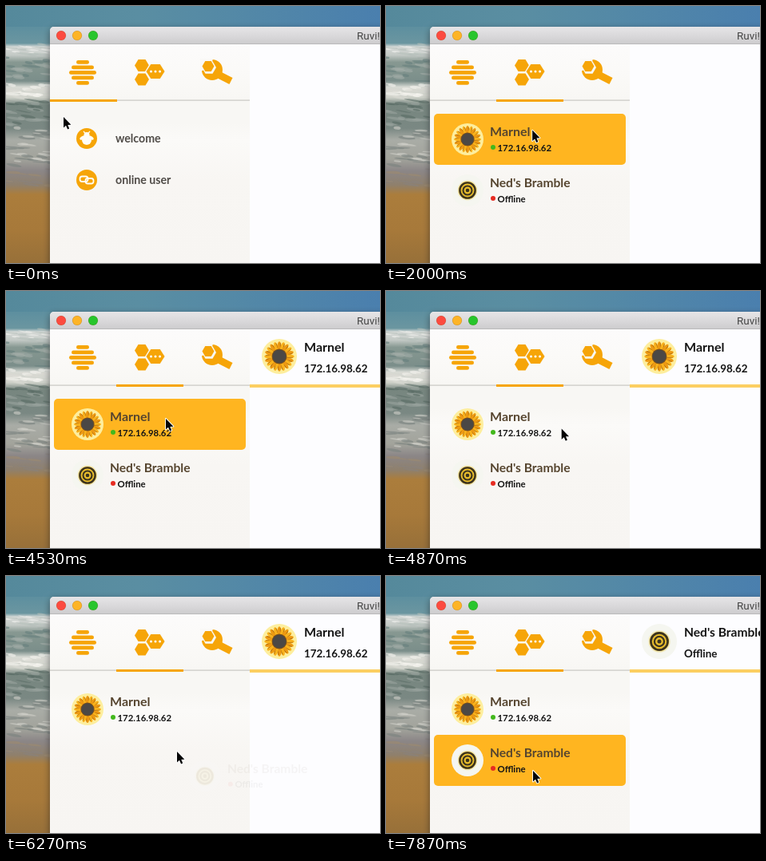
An HTML page with a canvas for the animation above (8.07 s loop, 468 by 322 pixels).

```html
<!DOCTYPE html>
<html lang="en">
<head>
<meta charset="utf-8">
<title>Contact list</title>
<style>
html, body { margin: 0; width: 100%; height: 100%; overflow: hidden; }
canvas { display: block; width: 468px; height: 322px; }
</style>
</head>
<body>
<canvas id="stage"></canvas>
<script>
const W = 468, H = 322, LOOP = 8070, TAU = Math.PI * 2;
const ORANGE = '#f6a508', ROW = '#ffb520', PANEL = '#f9f8f6';
const SANS = 'Lato, "Open Sans", sans-serif';
const canvas = document.getElementById('stage');
const dpr = window.devicePixelRatio || 1;
canvas.width = W * dpr;
canvas.height = H * dpr;
let c = canvas.getContext('2d');

const ease = p => p < .5 ? 2 * p * p : 1 - 2 * (1 - p) * (1 - p);
const ramp = (t, a, b) => ease(Math.min(1, Math.max(0, (t - a) / (b - a))));
const mix = (a, b, p) => a + (b - a) * p;

function rect(x, y, w, h, fill, r = 0) {
  c.fillStyle = fill;
  c.beginPath();
  c.roundRect(x, y, w, h, r);
  c.fill();
}

function disc(x, y, r, fill) {
  c.fillStyle = fill;
  c.beginPath();
  c.arc(x, y, r, 0, TAU);
  c.fill();
}

function ring(x, y, r, width, color) {
  c.strokeStyle = color;
  c.lineWidth = width;
  c.beginPath();
  c.arc(x, y, r, 0, TAU);
  c.stroke();
}

function poly(points, fill) {
  c.fillStyle = fill;
  c.beginPath();
  points.forEach(([x, y]) => c.lineTo(x, y));
  c.closePath();
  c.fill();
}

function hexagon(x, y, rx, ry, fill) {
  poly([[x - rx, y], [x - rx / 2, y - ry], [x + rx / 2, y - ry],
    [x + rx, y], [x + rx / 2, y + ry], [x - rx / 2, y + ry]], fill);
}

function text(s, x, y, size, color, weight = 700, family = SANS) {
  c.font = `${weight} ${size}px ${family}`;
  c.fillStyle = color;
  c.fillText(s, x, y);
}

function gradient(x0, y0, x1, y1, stops) {
  const g = c.createLinearGradient(x0, y0, x1, y1);
  stops.forEach(([p, color]) => g.addColorStop(p, color));
  return g;
}

// Draws with an offset and opacity.
function layer(alpha, dx, dy, draw) {
  if (alpha <= 0) return;
  c.save();
  c.globalAlpha *= alpha;
  c.translate(dx, dy);
  draw();
  c.restore();
}

// Brings content in from the lower right; p = 1 is at rest.
const slide = (p, draw) => layer(p * p, 187 * (1 - p), 25 * (1 - p), draw);

function wallpaper() {
  rect(0, 0, W, 50, gradient(0, 0, W, 0,
    [[0, '#55899b'], [.35, '#5a8ea2'], [.6, '#5489a6'], [1, '#4a7fae']]));
  rect(0, 26, 60, H - 26, gradient(0, 26, 0, H, [
    [0, '#5d8f9f'], [.07, '#6b96a0'], [.085, '#d5d9d6'], [.12, '#c3c9c5'],
    [.15, '#879891'], [.23, '#7b8e8a'], [.255, '#d8dad4'], [.3, '#cdd0c8'],
    [.33, '#77867f'], [.43, '#7a8883'], [.48, '#a9aca6'], [.56, '#a2a39b'],
    [.61, '#8b8687'], [.67, '#8f806c'], [.71, '#ab7d3c'], [.86, '#a7793a'], [1, '#977039']]));
  let seed = 11;
  const rnd = () => (seed = (seed * 16807) % 2147483647) / 2147483647;
  const flecks = (n, top, bottom, colors) => {
    for (let i = 0; i < n; i++) {
      c.fillStyle = colors[i % colors.length];
      c.beginPath();
      c.ellipse(rnd() * 56, mix(top, bottom, rnd()), 4 + rnd() * 9, .6 + rnd() * 1.5, rnd() * .2, 0, TAU);
      c.fill();
    }
  };
  c.globalAlpha = .6;
  flecks(16, 48, 61, ['#f1f1ee', '#b5bfbb']);
  flecks(22, 64, 95, ['#667f7d', '#a3aea9']);
  flecks(28, 97, 115, ['#f6f5f0', '#d8d9d2']);
  flecks(26, 118, 150, ['#596a64', '#99a49e']);
  flecks(30, 152, 200, ['#d0d0c9', '#7a827e']);
  flecks(10, 204, 226, ['#88827d', '#9d8a70']);
  c.globalAlpha = 1;
}

function hiveIcon() {
  [8, 14, 17, 14, 8].forEach((w, i) =>
    rect(96 - w, 68 + i * 6.5, w * 2, 4.8, ORANGE, 2.4));
}

function hexIcon() {
  hexagon(170, 74.5, 9, 7.5, ORANGE);
  hexagon(170, 92, 9, 7.5, ORANGE);
  hexagon(187, 82, 13, 10.5, PANEL);
  hexagon(187, 82, 11.5, 9, ORANGE);
  [181.5, 187, 192.5].forEach(x => disc(x, 82, 1.5, '#fff'));
}

function wrenchIcon() {
  c.strokeStyle = ORANGE;
  c.lineCap = 'butt';
  c.lineWidth = 9;
  c.beginPath();
  c.moveTo(262, 84);
  c.lineTo(281.5, 94);
  c.stroke();
  disc(258, 80, 13, ORANGE);
  poly([[243, 82], [243, 66], [259, 66], [256, 77]], PANEL);
  hexagon(254, 77, 9, 7.8, PANEL);
  hexagon(253, 75.5, 7.5, 6.6, ORANGE);
}

function windowFrame() {
  c.save();
  c.shadowColor = 'rgba(20,20,25,.5)';
  c.shadowBlur = 10 * dpr;
  c.shadowOffsetY = 3 * dpr;
  rect(55, 26, 430, 320, PANEL, [5, 0, 0, 0]);
  c.restore();
  rect(55, 26, 430, 22, gradient(0, 26, 0, 48,
    [[0, '#e6e5e7'], [.5, '#dad9db'], [1, '#cccbcd']]), [5, 0, 0, 0]);
  rect(55, 47.3, 430, .7, '#b5b4b4');
  ['#fc4b40', '#fdb427', '#27c52c'].forEach((color, i) => {
    disc(69 + i * 20, 37, 6, color);
    ring(69 + i * 20, 37, 5.8, .6, 'rgba(110,60,0,.3)');
  });
  text('Ruvi!', 439, 42, 13.5, '#474747', 400, 'Roboto, Inter, sans-serif');
  rect(55, 48, 250, 274, gradient(0, 48, 0, H, [
    [0, '#fcfbfb'], [.12, '#fbfaf8'], [.25, '#f8f7f4'], [.36, '#f8f7f4'],
    [.44, '#fbfaf8'], [.62, '#f8f6f3'], [1, '#f7f5f2']]));
  rect(305, 48, 163, 274, '#fdfdff');
  hiveIcon();
  hexIcon();
  wrenchIcon();
  rect(55, 117.4, 250, 1.4, '#cbc9c6');
}

function welcomeList() {
  disc(101, 166, 13, ORANGE);
  const pale = '#fffdf6';
  disc(101, 168, 6, pale);
  disc(101, 161.5, 3.5, pale);
  c.fillStyle = pale;
  [-1, 1].forEach(s => {
    c.beginPath();
    c.ellipse(101 + s * 5, 165, 4, 2, s * .5, 0, TAU);
    c.fill();
  });
  c.strokeStyle = pale;
  c.lineWidth = 1.2;
  c.beginPath();
  c.moveTo(97, 157); c.lineTo(99.5, 160);
  c.moveTo(105, 157); c.lineTo(102.5, 160);
  c.stroke();

  disc(101, 218, 13, ORANGE);
  c.lineWidth = 1.8;
  [[92.5, 213.5], [99.5, 216]].forEach(([x, y]) => {
    c.beginPath();
    c.roundRect(x, y, 10, 6.5, 2.8);
    c.stroke();
  });
  text('welcome', 137, 171, 14.2, '#504c48');
  text('online user', 137, 223, 14.2, '#504c48');
}

function sunflower(x, y, k) {
  c.save();
  c.translate(x, y);
  c.scale(k, k);
  disc(0, 0, 20, '#fdee9e');
  for (let i = 0; i < 20; i++) {
    c.rotate(TAU / 20);
    c.fillStyle = i % 2 ? '#f9b21c' : '#ee9a12';
    c.beginPath();
    c.ellipse(11.5, 0, 5.5, 2.2, 0, 0, TAU);
    c.fill();
    c.strokeStyle = '#9a5b12';
    c.lineWidth = .6;
    c.beginPath();
    c.moveTo(8, 1.6);
    c.lineTo(15.5, 1);
    c.stroke();
  }
  disc(0, 0, 8.6, '#77501f');
  disc(0, 0, 7.6, '#4b4845');
  c.restore();
}

function bullseye(x, y, k) {
  c.save();
  c.translate(x, y);
  c.scale(k, k);
  disc(0, 0, 20, '#f5f6f0');
  disc(0, 0, 12.4, '#efe6b4');
  disc(0, 0, 11, '#e9bd2c');
  ring(0, 0, 9.6, 2.4, '#3b3320');
  ring(0, 0, 5.5, 2.1, '#3b3320');
  disc(0, 0, 2.3, '#3b3320');
  c.restore();
}

const people = [
  { name: 'Marnel', state: '172.16.98.62', dot: '#42b81c', size: 16, avatar: sunflower },
  { name: "Ned's Bramble", state: 'Offline', dot: '#e62b22', size: 15.6, avatar: bullseye }
];

function personRow(i, glow) {
  const p = people[i], y = 135 + i * 64;
  layer(glow, 0, 0, () => rect(60, y, 240, 64, ROW, 5));
  p.avatar(102, y + 32, 1);
  text(p.name, 130, y + 28, p.size, '#56452f');
  disc(134, y + 42, 3, p.dot);
  text(p.state, 139.5, y + 46.5, 11.4, '#151515');
}

function header(i) {
  const p = people[i];
  rect(305, 48, 163, 73, '#fdfdff');
  p.avatar(342, 82, 1.1);
  text(p.name, 373, 76, p.size, '#151515');
  text(p.state, 373, 101.5, 13.4, '#151515');
  rect(305, 117, 163, 4, '#fccf62');
}

function tooltip() {
  rect(177, 171, 36, 15, '#f0e6d2', 1);
  c.strokeStyle = '#c9bca4';
  c.lineWidth = .7;
  c.strokeRect(177, 171, 36, 15);
  text('online', 180, 182, 11, '#45423c', 400);
}

// Pointer stops: time, x, y
const stops = [
  [0, 72, 139], [70, 72, 139], [620, 195, 84], [1130, 195, 84],
  [1650, 184, 156], [3270, 175, 152], [3500, 175, 152],
  [4330, 200, 160], [4530, 200, 160], [5200, 238, 184], [5470, 238, 184],
  [5930, 214, 220], [6730, 214, 220], [7270, 184, 244], [LOOP, 184, 244]
];

function pointer(t) {
  const i = stops.findIndex(s => s[0] > t);
  const [t0, x0, y0] = stops[i - 1], [t1, x1, y1] = stops[i];
  const p = ramp(t, t0, t1);
  c.save();
  c.translate(mix(x0, x1, p), mix(y0, y1, p));
  c.beginPath();
  [[0, 0], [0, 13.5], [3, 10.8], [5.1, 15.4], [7.2, 14.4], [5.3, 9.9], [9.4, 9.7]]
    .forEach(([x, y]) => c.lineTo(x, y));
  c.closePath();
  c.strokeStyle = '#fff';
  c.lineWidth = 1.8;
  c.lineJoin = 'round';
  c.stroke();
  c.fillStyle = '#050505';
  c.fill();
  c.restore();
}

// The backdrop never changes, so it is painted once.
const back = document.createElement('canvas');
back.width = canvas.width;
back.height = canvas.height;
const main = c;
c = back.getContext('2d');
c.scale(dpr, dpr);
wallpaper();
windowFrame();
c = main;
c.scale(dpr, dpr);

function draw(t) {
  c.drawImage(back, 0, 0, W, H);
  rect(mix(55, 138, ramp(t, 620, 870)), 117, 84, 3, ORANGE);

  layer(ramp(t, 3340, 3470), 0, 0, () => header(0));
  layer(ramp(t, 7500, 7670), 0, 0, () => header(1));

  layer(1 - ramp(t, 620, 780), 0, 0, welcomeList);
  const glow0 = ramp(t, 1380, 1500) * (1 - ramp(t, 4680, 4820));
  slide(ramp(t, 640, 1040), () => personRow(0, glow0));

  const shown = t < 6000
    ? ramp(t, 720, 1120) * (1 - ramp(t, 5500, 5900))
    : ramp(t, 6140, 6540);
  slide(shown, () => personRow(1, ramp(t, 6930, 7070)));

  layer(ramp(t, 3150, 3300) * (1 - ramp(t, 3450, 3600)), 0, 0, tooltip);
  pointer(t);
}

function tick() {
  draw(performance.now() % LOOP);
  requestAnimationFrame(tick);
}
tick();
</script>
</body>
</html>
```
